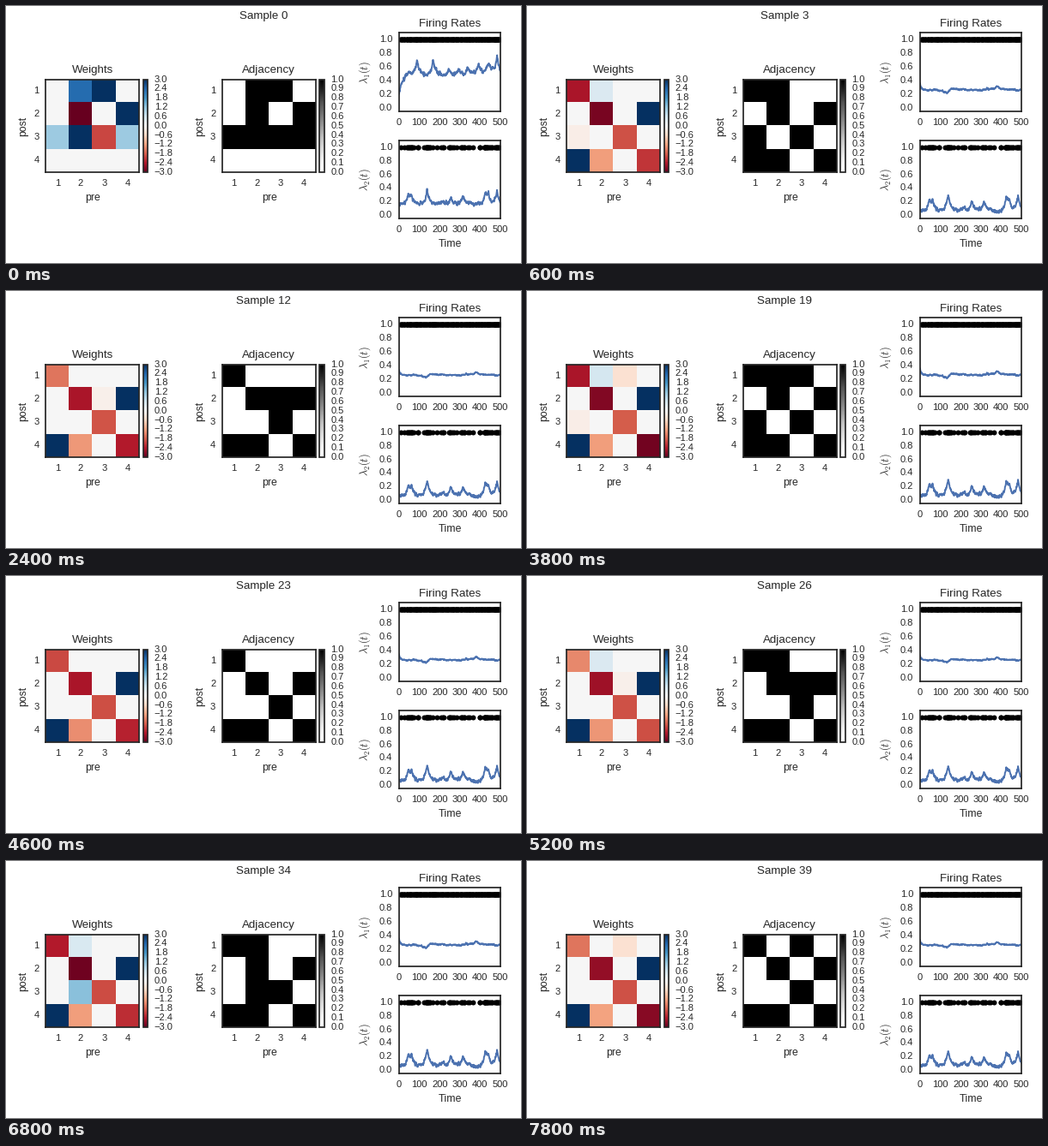
Write a matplotlib script that moves like this. It is 600 by 300 pixels and loops after 8 s.

```python
import numpy as np
import matplotlib.pyplot as plt
from matplotlib.animation import FuncAnimation

W, H, DPI = 600, 300, 100
SAMPLES = 40
INK = "0.15"

plt.rcParams.update({
    "font.family": "sans-serif", "font.sans-serif": ["Liberation Sans"],
    "mathtext.fontset": "cm", "text.color": INK, "text.kerning_factor": 6,
    "axes.edgecolor": INK, "axes.linewidth": 1.25,
    "axes.titlesize": 9.6, "axes.titlepad": 5.2,
    "xtick.color": INK, "ytick.color": INK,
    "xtick.labelsize": 8, "ytick.labelsize": 8,
    "xtick.major.size": 0, "ytick.major.size": 0,
    "xtick.major.pad": 5.6, "ytick.major.pad": 5.6,
    "ytick.alignment": "center",
})

START = np.array([[0, 2.3, 3, 0], [0, -3, 0, 3], [1.1, 3, -2, 1.1], [0] * 4])

# Weak links that come and go: cell, mean weight, period, phase, run
LINKS = [((0, 1), 0.5, 8, 2, 2), ((0, 2), -0.45, 20, 19, 1),
         ((1, 2), -0.15, 14, 12, 1), ((2, 0), -0.2, 16, 3, 1),
         ((2, 1), 1.3, 13, 8, 1)]


def wave(k, period, peak):
    return np.cos(2 * np.pi * (k - peak) / period)


def sample_weights(k):
    if k == 0:
        return START
    rng = np.random.default_rng(k)
    fast, slow = wave(k, 13.5, 19), wave(k, 21, 18)
    w = np.diag([-2.05 - 0.45 * fast, -2.8 - 0.2 * fast, -1.9,
                 -2.3 - 0.5 * slow])
    w[3, 1] = -1.3
    for cell, mean, period, phase, run in LINKS:
        if (k - phase) % period < run:
            w[cell] = mean
    w = w * rng.normal(1, 0.05, w.shape)
    w[1, 3] = w[3, 0] = 3
    return np.clip(w, -3, 3)


# Firing rates: jittered sums of pulses with exponential flanks
T = np.arange(0, 500.5, 1)
BURSTS = [(45, .17), (61, .12), (138, .26), (210, .05), (255, .13),
          (315, .16), (425, .22), (441, .14), (483, .23)]
CLIMBS = [(45, .07), (88, .22), (168, .22), (245, .1), (292, .09),
          (340, .12), (393, .17), (440, .18), (483, .26)]
RIPPLES = [(70, .02), (132, -.06), (155, .05), (215, .025), (330, .025),
           (380, .06), (445, .02)]


def pulses(peaks, rise, fall):
    total = np.zeros(len(T))
    for peak, height in peaks:
        d = T - peak
        total += height * np.exp(np.where(d < 0, d / rise, -d / fall))
    return total


def jitter(seed, size, keep=0.65):
    out = np.random.default_rng(seed).normal(0, size, len(T))
    for i in range(1, len(T)):
        out[i] += keep * out[i - 1]
    return out


bursts = pulses(BURSTS, 8, 12)
start_rates = (0.47 - 0.27 * np.exp(-T / 15) + pulses(CLIMBS, 12, 15)
               + jitter(1, .014),
               0.165 + 0.8 * bursts + jitter(2, .011))
ripple = 0.09 * np.exp(-T / 8) + pulses(RIPPLES, 18, 18) + jitter(3, .005)
burst = bursts + jitter(4, .012)


def sample_rates(k, w):
    if k == 0:
        return start_rates
    swing = 0.35 + 0.27 * abs(w[0, 0])
    gain = 0.95 - 0.05 * wave(k, 13.5, 26)
    return 0.255 + swing * ripple, np.maximum(0.065 + gain * burst, 0.03)


def spikes(rate, count, seed):
    """Place spikes evenly along the accumulated rate, with some scatter."""
    total = np.cumsum(rate)
    steps = np.arange(count) + np.random.default_rng(seed).uniform(0, 1, count)
    return np.interp(steps / count, total / total[-1], T)


fig = plt.figure(figsize=(W / DPI, H / DPI), dpi=DPI, facecolor="white")


def panel(left, top, right, bottom):
    return fig.add_axes([left / W, 1 - bottom / H,
                         (right - left) / W, (bottom - top) / H])


def label(x, y, text, rotation=0):
    fig.text(x / W, 1 - y / H, text, size=8.8, rotation=rotation,
             ha="center", va="center")


def matrix(left, title, cmap, low, high, ticks):
    top, bottom = 85.6, 193.8
    ax = panel(left, top, left + 108.8, bottom)
    image = ax.imshow(np.zeros((4, 4)), cmap=cmap, vmin=low, vmax=high,
                      interpolation="nearest", aspect="auto")
    ax.set_xticks(range(4), range(1, 5))
    ax.set_yticks(range(4), range(1, 5))
    ax.set_title(title)
    bar = fig.colorbar(image, cax=panel(left + 113.4, top,
                                        left + 118.8, bottom))
    bar.set_ticks(ticks, labels=[f"{t:.1f}".replace("-", "\u2212")
                                 for t in ticks])
    bar.ax.minorticks_off()
    label(left + 54.8, 224, "pre")
    label(left - 26, 140, "post", 90)
    return image


def rate_plot(top, bottom, index, times):
    ax = panel(458, top, 576, bottom)
    ax.plot(times, np.ones(len(times)), "ko", ms=4.3, mew=0)
    line, = ax.plot([], [], color="#4c72b0", lw=1.4)
    ax.set_xlim(0, 500)
    ax.set_ylim(-0.05, 1.1)
    ax.set_xticks(range(0, 501, 100))
    ax.set_yticks(np.arange(6) / 5)
    label(418, (top + bottom) / 2 + 0.5, rf"$\lambda_{index}(t)$", 90)
    return ax, line


weights = matrix(46.2, "Weights", "RdBu", -3, 3, np.arange(5, -6, -1) * 0.6)
adjacency = matrix(252, "Adjacency", "Greys", 0, 1, np.arange(11) / 10)
top_ax, line1 = rate_plot(31, 123, 1, spikes(start_rates[0], 190, 5))
_, line2 = rate_plot(157, 248, 2, spikes((0.065 + bursts) ** 1.4, 62, 6))
top_ax.set_title("Firing Rates")
label(517, 278, "Time")
heading = fig.suptitle("", size=9.6, y=0.98)


def update(k):
    w = sample_weights(k)
    weights.set_data(w)
    adjacency.set_data((w != 0).astype(float))
    for line, rate in zip((line1, line2), sample_rates(k, w)):
        line.set_data(T, rate)
    heading.set_text(f"Sample {k}")
    return weights, adjacency, line1, line2, heading


anim = FuncAnimation(fig, update, frames=SAMPLES, interval=200,
                     init_func=lambda: update(0), repeat=True,
                     repeat_delay=0, blit=False)
plt.show()
```
